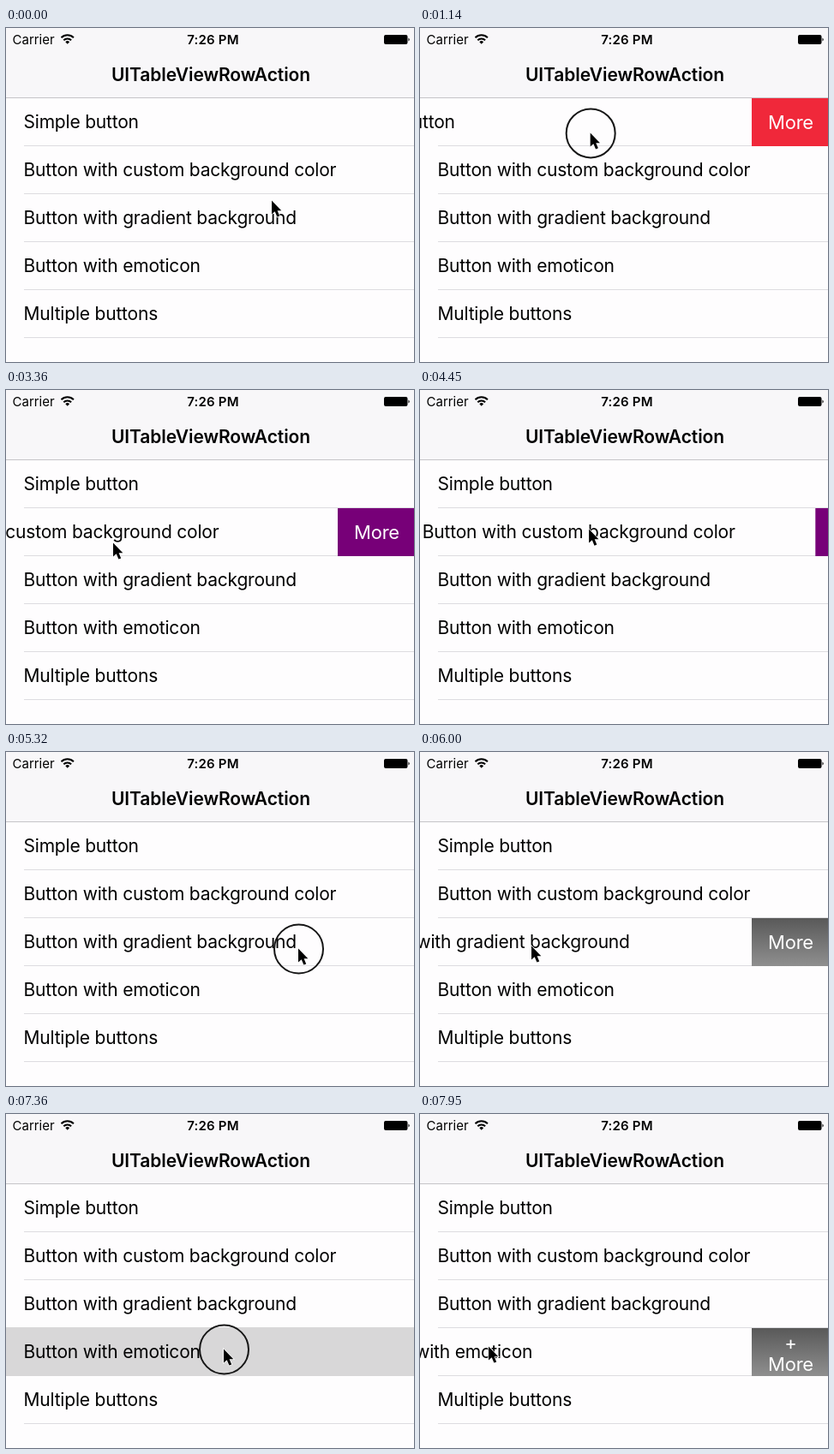
Recreate the animation shown at these times as an HTML page. Size 476 by 390 pixels, loop 8 s.

```html
<!DOCTYPE html>
<html lang="en">
<head>
<meta charset="utf-8">
<title>Row actions</title>
<style>
  html, body { margin: 0; width: 100%; height: 100%; overflow: hidden; background: #fefdfe; }
  svg { display: block; width: 476px; height: 390px; font: 21px Inter, "Open Sans", sans-serif; letter-spacing: -.2px; }
  .title { font-weight: 600; letter-spacing: -.08px; text-anchor: middle; }
  .status { font-size: 15px; letter-spacing: 0; }
  .clock { font-weight: 600; letter-spacing: .2px; text-anchor: middle; }
  .label { font-size: 22px; fill: #fff; text-anchor: middle; }
</style>
</head>
<body>
<svg viewBox="0 0 476 390">
  <defs>
    <linearGradient id="shade" x2="0" y2="1">
      <stop stop-color="#595959"/><stop offset="1" stop-color="#8f8f8f"/>
    </linearGradient>
  </defs>
  <rect width="476" height="390" fill="#fefdfe"/>
  <rect width="476" height="81" fill="#f8f7f9"/>
  <rect y="81" width="476" height="1" fill="#c6c5c8"/>
  <text class="status" x="7.5" y="18.5">Carrier</text>
  <g fill="none" stroke="#000" stroke-width="2">
    <path d="M64.5 11.2a10.3 10.3 0 0 1 14.4 0M67.3 14.2a6.3 6.3 0 0 1 8.8 0"/>
    <path d="M69.3 16.2a3.4 3.4 0 0 1 4.8 0L71.7 18.7Z" fill="#000" stroke="none"/>
  </g>
  <text class="status clock" x="241.5" y="18.5">7:26 PM</text>
  <rect x="441" y="8" width="27.5" height="11" rx="2"/>
  <path d="M469.5 11.5q2.5 2 0 4Z"/>
  <text class="title" x="239" y="61.5">UITableViewRowAction</text>
  <g id="table"></g>
  <circle id="touch" r="28.5" fill="none" stroke="#161616" stroke-width="2"/>
  <path id="cursor" d="M1 1.5V17.5L4.7 14.2L7.4 20.6L10.2 19.4L7.6 13.2H12.3Z" stroke="#fff" stroke-width="1.4" paint-order="stroke"/>
</svg>
<script>
const DURATION = 8000, STAGE_WIDTH = 476, TOP = 82, PITCH = 56, BUTTON_WIDTH = 89;
const OPEN = 92, STRETCH = .42, SPRING = 90;      // rest distance, rubber band, settling time
const SWIPE = 345, RETURN = 600, PUSH = [72, -16]; // swipe and push-back durations, push-back travel
const HOLD_DELAY = 190;

// Each swipe: touch at `from`, drag to `to`, later push back to close
const rows = [
  { text: 'Simple button', fill: '#f0283a', label: ['More'],
    press: 540, drag: 905, close: 1590, from: [342, 111], to: [153, 124] },
  { text: 'Button with custom background color', fill: '#770078', label: ['More'],
    press: 2750, drag: 2995, close: 3840, from: [351, 165], to: [124, 177] },
  { text: 'Button with gradient background', fill: 'url(#shade)', label: ['More'],
    press: 5150, drag: 5375, close: 6200, from: [340, 228], to: [129, 225] },
  { text: 'Button with emoticon', fill: 'url(#shade)', label: ['+', 'More'],
    press: 7160, drag: 7400, close: Infinity, from: [253, 273], to: [79, 270] },
  { text: 'Multiple buttons' },
];
const swipes = rows.filter(row => row.press);

const REST = [309, 200];
const moves = [];
let leave = 140;
for (const { press, drag, close, from, to } of swipes) {
  moves.push(
    { start: leave, end: press - 20, to: from },
    { start: drag, end: drag + SWIPE, to },
    { start: close, end: close + RETURN, to: to.map((value, axis) => value + PUSH[axis]) });
  leave = close + RETURN;
}

const ease = u => u * u * (3 - 2 * u);

function pointerAt(t) {
  return moves.filter(move => t > move.start).reduce((point, { start, end, to }) => {
    const amount = ease(Math.min(1, (t - start) / (end - start)));
    return point.map((value, axis) => value + (to[axis] - value) * amount);
  }, REST);
}

const rubber = distance => Math.min(distance, OPEN) + STRETCH * Math.max(0, distance - OPEN);

// Distance the row is pulled to the left: follows the finger, springs when released
function pullOf({ drag, close, from, to }, t, x) {
  const released = drag + SWIPE, closed = close + RETURN;
  if (t < drag) return 0;
  if (t < released) return rubber(from[0] - x);
  if (t < close) return OPEN + (rubber(from[0] - to[0]) - OPEN) * Math.exp((released - t) / SPRING);
  if (t < closed) return OPEN - (x - to[0]);
  return (OPEN - PUSH[0]) * Math.exp((closed - t) / SPRING);
}

function add(parent, tag, attributes, text = '') {
  const node = document.createElementNS('http://www.w3.org/2000/svg', tag);
  for (const name in attributes) node.setAttribute(name, attributes[name]);
  node.textContent = text;
  return parent.appendChild(node);
}

const within = (t, start, end) => t >= start && t < end;
const show = (node, visible) => node.setAttribute('visibility', visible ? 'visible' : 'hidden');
const place = (node, x, y) => node.setAttribute('transform', `translate(${x} ${y})`);
const table = document.getElementById('table');
const touch = document.getElementById('touch');
const cursor = document.getElementById('cursor');

rows.forEach((row, i) => {
  const group = add(table, 'g', { transform: `translate(0 ${TOP + i * PITCH})` });
  add(group, 'rect', { x: 21, y: 55, width: 455, height: 1, fill: '#dddce0' });
  if (row.press) row.highlight = add(group, 'rect', { y: -1, width: STAGE_WIDTH, height: 57, fill: '#d8d7d8' });
  row.caption = add(group, 'text', { x: 20.5, y: 34.5 }, row.text);
  if (!row.press) return;
  row.button = add(group, 'g', {});
  add(row.button, 'rect', { width: BUTTON_WIDTH, height: 56, fill: row.fill });
  row.label.forEach((line, n) => add(row.button, 'text',
    { class: 'label', x: 45.5, y: row.label.length > 1 ? 25 + n * 25 : 35.5 }, line));
});

function draw(t) {
  const [x, y] = pointerAt(t);
  for (const row of swipes) {
    const pull = pullOf(row, t, x);
    place(row.caption, -pull, 0);
    place(row.button, STAGE_WIDTH - Math.max(0, Math.min(BUTTON_WIDTH, pull - 3)), 0);
    show(row.highlight, within(t, row.press + HOLD_DELAY, row.drag));
  }
  place(cursor, x, y);
  place(touch, x + 1.5, y + 2);
  show(touch, swipes.some(({ press, drag, close }) =>
    within(t, press, drag + SWIPE) || within(t, close, close + RETURN)));
}

const start = performance.now();
function tick() {
  draw((performance.now() - start) % DURATION);
  requestAnimationFrame(tick);
}
tick();
</script>
</body>
</html>
```
